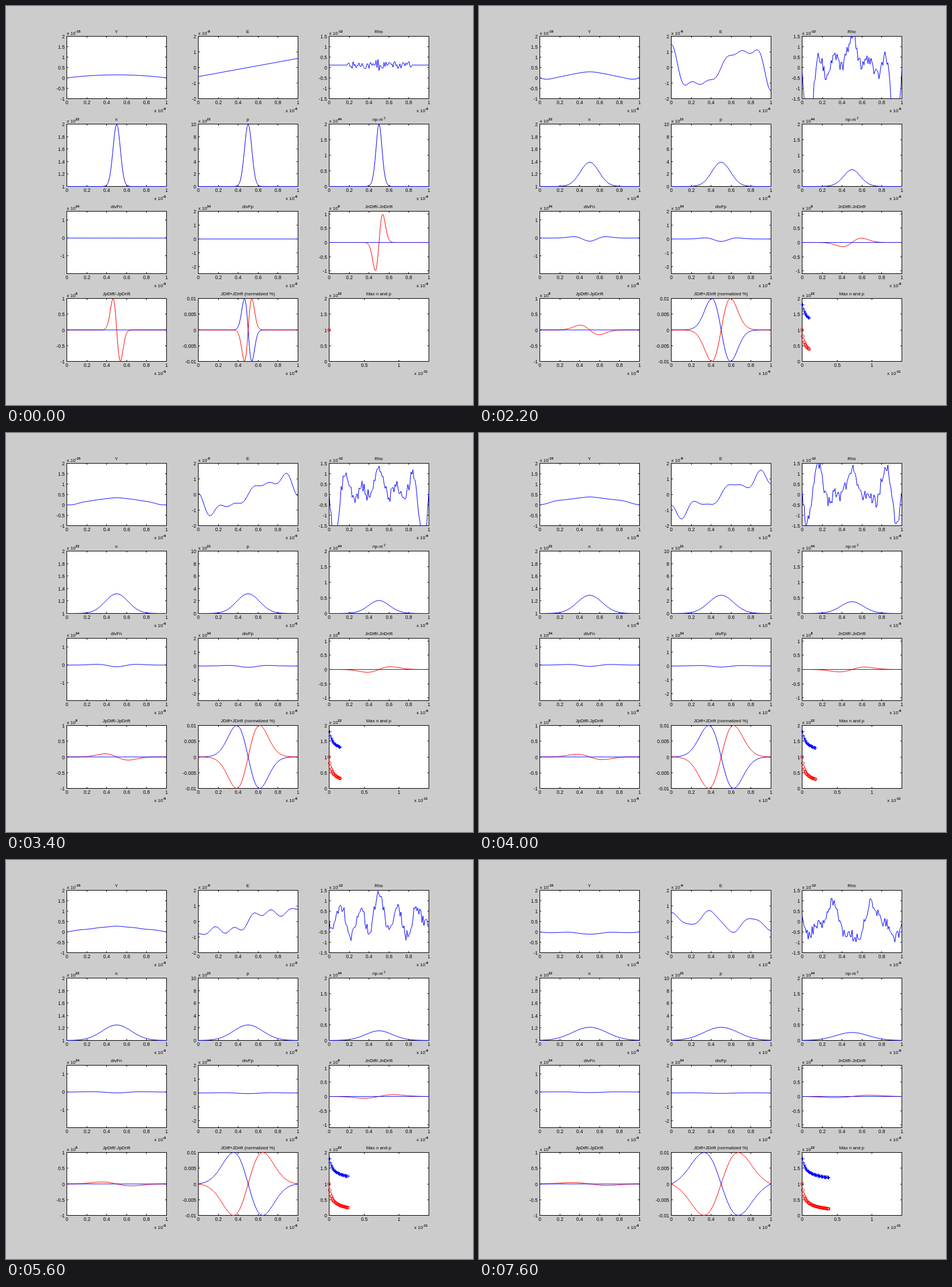
These frames come from a looping animation (810 px wide and 691 px high, 8 s). An HTML page with a canvas:

```html
<!DOCTYPE html>
<html lang="en">
<head>
<meta charset="utf-8">
<title>Carrier diffusion</title>
<style>
html, body { margin: 0; width: 100%; height: 100%; overflow: hidden; background: #ccc; }
canvas { display: block; }
</style>
</head>
<body>
<canvas id="stage" width="810" height="691"></canvas>
<script>
const ctx = document.getElementById('stage').getContext('2d');
const LOOP = 8000, STEP = 200, SAMPLES = 100;
const HELD = [200, 800, 1400, 2000, 3600, 6400, 7800];
const BLUE = '#00f', RED = '#f00';
const FONT = '"Liberation Sans", Arial, sans-serif';
const COLS = [105, 333, 560], ROWS = [52, 204, 355, 506], W = 173;
const MARK_GAP = 1.21, SPREAD = 0.566;

// title, exponent, low, high, tick step
const PANELS = [
  ['Y', '-15', -1, 2, 0.5],
  ['E', '-9', -2, 2, 1],
  ['Rho', '-12', -1.5, 1.5, 0.5],
  ['n', '22', 1, 2, 0.2],
  ['p', '21', 0, 10, 2],
  ['np-ni', '44', 0, 2, 0.5],
  ['divFn', '34', -1.99, 1.5, 1],
  ['divFp', '34', -2.5, 2, 1],
  ['JnDiff/-JnDrift', '8', -1.1, 1.1, 0.5],
  ['JpDiff/-JpDrift', '8', -1, 1, 0.5],
  ['JDiff+JDrift (normalized %)', '', -0.01, 0.01, 0.005],
  ['Max n and p', '22', 0, 2, 0.5]
].map(([title, exp, lo, hi, step], i) => {
  const row = Math.floor(i / 3);
  return { title, exp, lo, hi, step, x: COLS[i % 3], y: ROWS[row], h: row === 3 ? 109 : 108 };
});

// Time, then strengths of the odd standing waves of the field (1, 3, 5, ...)
const WAVES = [
  [0, 0, 0, 0, 0, 0, 0],
  [1200, -.37, 1.46, .35, .6, .32, .2],
  [2800, -.8, .55, .35, .34, .19, .22],
  [4000, -1.13, 0, -.17, .27, .19, .16],
  [5600, -.77, .13, -.18, -.04, -.08, .16],
  [6800, -.49, -.09, .31, -.2, .14, .1],
  [7600, .21, -.15, .45, 0, 0, .07]
];

const markCount = t => Math.round(t / STEP - 1.3 * Math.sin(Math.PI * t / 7500) ** 2);
const peakAt = count => 1 / Math.sqrt(1 + SPREAD * count);

function noise(i, seed) {
  const s = Math.sin(i * 127.1 + seed * 311.7) * 43758.5453;
  return (s - Math.floor(s)) * 2 - 1;
}

function wavesAt(t) {
  const next = Math.max(1, WAVES.findIndex(row => row[0] >= t));
  const a = WAVES[next - 1], b = WAVES[next];
  const f = (t - a[0]) / (b[0] - a[0]);
  return a.slice(1).map((v, i) => ({ amp: v + (b[i + 1] - v) * f, freq: (2 * i + 1) * Math.PI }));
}

function text(s, x, y, size, align = 'left', weight = '') {
  ctx.font = `${weight} ${size}px ${FONT}`;
  ctx.textAlign = align;
  ctx.fillText(s, x, y);
}

function power(exp, x, y) {
  text('x 10', x, y, 8);
  text(exp, x + 15, y - 4, 6, 'left', 'bold');
}

const toY = (p, v) => p.y + 0.5 + p.h * (p.hi - v) / (p.hi - p.lo);

function drawAxes(p) {
  const { x, y, h } = p, timeAxis = p.title.startsWith('Max'), bottom = y + h;
  ctx.fillStyle = '#fff';
  ctx.fillRect(x, y, W, h);
  ctx.strokeStyle = '#000';
  ctx.strokeRect(x + 0.5, y + 0.5, W, h);
  ctx.fillStyle = '#000';
  for (const v of timeAxis ? [0, 0.5, 1] : [0, 0.2, 0.4, 0.6, 0.8, 1]) {
    const tx = Math.round(x + v * (timeAxis ? 121 : W));
    ctx.fillRect(tx, y, 1, 3);
    ctx.fillRect(tx, bottom - 2, 1, 3);
    text(v, tx + 0.5, bottom + 10, 8.4, 'center');
  }
  for (let k = Math.ceil(p.lo / p.step); k * p.step < p.hi + 1e-6; k++) {
    const v = k * p.step, ty = Math.round(toY(p, v) - 0.5);
    ctx.fillRect(x, ty, 3, 1);
    ctx.fillRect(x + W - 2, ty, 3, 1);
    text(+v.toFixed(3), x - 3, ty + 3.5, 8.4, 'right');
  }
  text(p.title, x + W / 2 - (p.title === 'np-ni' ? 2 : 0), y - 5, 7.9, 'center');
  if (p.title === 'np-ni') text('2', x + W / 2 + 8.5, y - 8, 6);
  if (p.exp) power(p.exp, x + 0.5, y - 2);
  power(timeAxis ? '-11' : '-6', x + W - (timeAxis ? 25 : 21), bottom + 24);
}

function plot(p, color, fn) {
  ctx.save();
  ctx.beginPath();
  ctx.rect(p.x, p.y, W + 1, p.h + 1);
  ctx.clip();
  ctx.beginPath();
  for (let i = 0; i <= SAMPLES; i++) {
    const u = i / SAMPLES;
    ctx.lineTo(p.x + 0.5 + u * W, toY(p, fn(u, i)));
  }
  ctx.strokeStyle = color;
  ctx.stroke();
  ctx.restore();
}

function drawMarkers(p, count) {
  for (let i = 0; i <= count; i++) {
    const peak = peakAt(i), x = Math.round(p.x + i * MARK_GAP) + 0.5;
    if (i) {
      const y = Math.round(toY(p, 1 + peak)) + 0.5;
      ctx.strokeStyle = BLUE;
      ctx.beginPath();
      ctx.moveTo(x - 3, y);
      ctx.lineTo(x + 3, y);
      ctx.moveTo(x, y - 3);
      ctx.lineTo(x, y + 3);
      ctx.stroke();
    }
    ctx.strokeStyle = RED;
    ctx.beginPath();
    ctx.arc(x, toY(p, peak), 2.5, 0, 7);
    ctx.stroke();
  }
}

function draw(t) {
  const count = markCount(t), peak = peakAt(count), sigma = 0.0364 / peak;

  // The field is a fading ramp plus standing waves; potential and charge follow from it
  const waves = wavesAt(t), ramp = 0.585 * Math.max(0, 1 - t / 1200);
  const sum = fn => waves.reduce((total, w) => total + fn(w.amp, w.freq), 0);
  const field = u => ramp * (2 * u - 1) + sum((a, k) => a * Math.cos(k * u));
  const potential = u => ramp * u * (1 - u) - sum((a, k) => a / k * Math.sin(k * u));
  const charge = u => 0.1 * (2 * ramp - sum((a, k) => a * k * Math.sin(k * u)));
  const rough = u => {
    const d = Math.abs(u - 0.5);
    return t ? 0.3 : d < 0.035 ? 0.42 : d < 0.32 ? 0.18 : 0;
  };

  const bell = u => Math.exp(-((u - 0.5) ** 2) / (2 * sigma * sigma));
  const slope = u => (u - 0.5) / sigma * bell(u) * Math.exp(0.5);
  const flux = u => slope(u) - slope(1) * (2 * u - 1) ** 3;
  const bend = u => t ? 3 * peak ** 3 * (((u - 0.5) / sigma) ** 2 - 1) * bell(u) : 0;
  const zero = () => 0;

  ctx.fillStyle = '#ccc';
  ctx.fillRect(0, 0, 810, 691);
  ctx.lineWidth = 1;
  PANELS.forEach(drawAxes);

  const [pot, fld, rho, n, p, np, divN, divP, jn, jp, net, max] = PANELS;
  plot(pot, BLUE, potential);
  plot(fld, BLUE, field);
  plot(rho, BLUE, (u, i) => charge(u) + rough(u) * noise(i, t / STEP));
  plot(n, BLUE, u => 1 + peak * bell(u));
  plot(p, BLUE, u => 10 * peak * bell(u));
  plot(np, BLUE, u => peak * bell(u) * (1 + peak * bell(u)));
  plot(divN, BLUE, bend);
  plot(divP, BLUE, bend);
  plot(jn, RED, u => peak * peak * flux(u));
  plot(jn, BLUE, zero);
  plot(jp, RED, u => -peak * peak * flux(u));
  plot(jp, BLUE, zero);
  plot(net, BLUE, u => -0.01 * flux(u));
  plot(net, RED, u => 0.01 * flux(u));
  drawMarkers(max, count);
}

function frame() {
  let t = Math.floor(performance.now() % LOOP / STEP) * STEP;
  if (HELD.includes(t)) t -= STEP;
  draw(t);
  requestAnimationFrame(frame);
}
frame();
</script>
</body>
</html>
```
